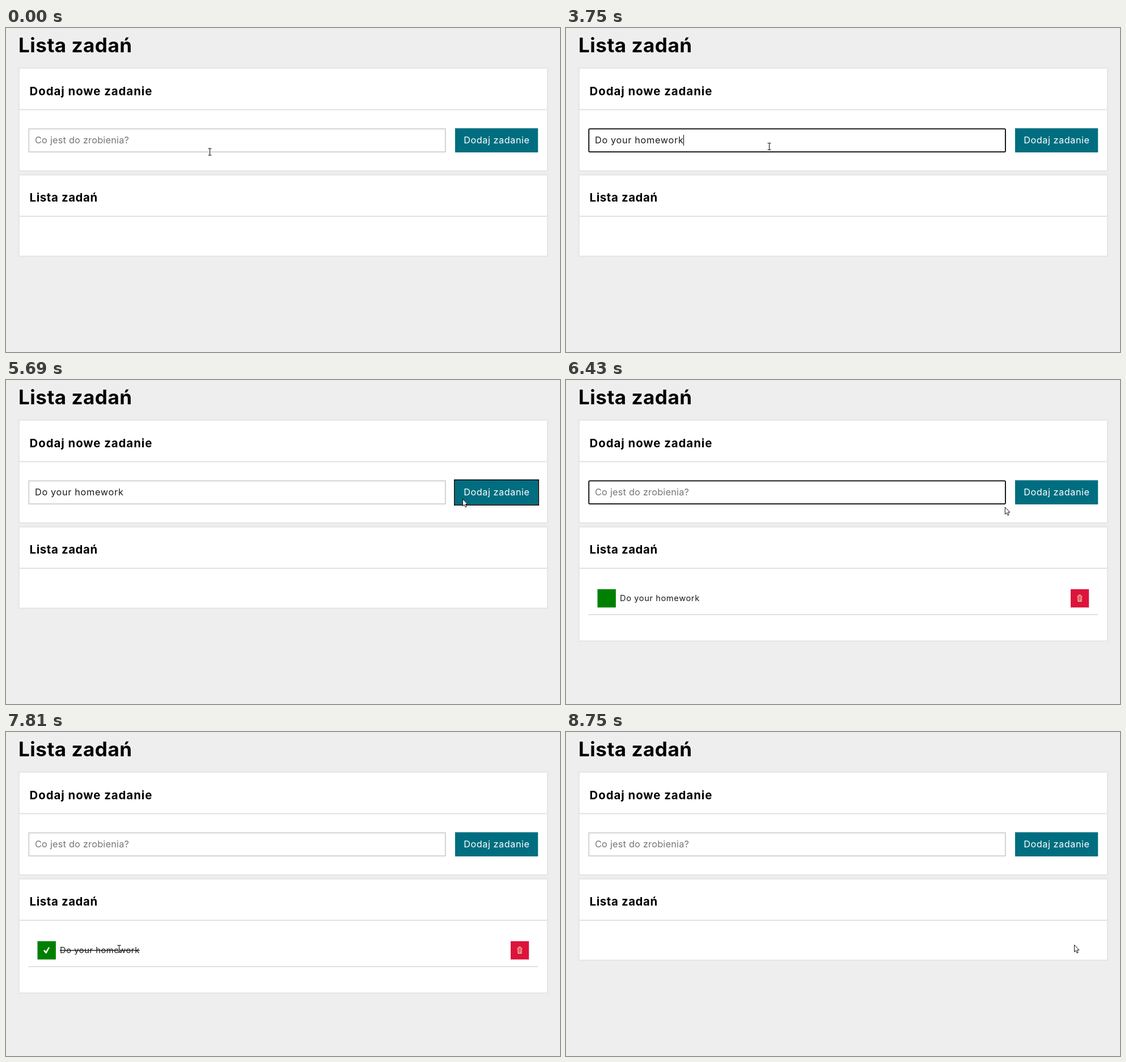
Recreate the animation shown at these times as an HTML page. Size 977 px wide and 573 px high, loop 9570 ms.

```html
<!DOCTYPE html>
<html lang="pl">
<head>
<meta charset="utf-8">
<title>Lista zadań</title>
<style>
  html, body { margin: 0; width: 100%; height: 100%; overflow: hidden; background: #eee; }
  svg { display: block; width: 977px; height: 573px; }
  text { font-family: Inter, "Open Sans", sans-serif; font-size: 16.3px; white-space: pre; }
  .h1 { font-size: 35px; font-weight: 700; letter-spacing: .5px; }
  .h2 { font-size: 20.4px; font-weight: 700; letter-spacing: .6px; }
  .h2.wide { letter-spacing: .94px; }
  .card { fill: #fff; stroke: #e7e7e7; stroke-width: 2.4; }
  .rule { stroke: #ddd; stroke-width: 1.7; }
  .field { fill: #fff; stroke: #ccc; stroke-width: 1.7; }
  .field.focus { stroke: #000; stroke-width: 1.8; }
  .hint { fill: #757575; letter-spacing: .22px; }
  .typed { fill: #1c1c1c; letter-spacing: .66px; }
  .label { fill: #fff; letter-spacing: .53px; }
  .task { fill: #1c1c1c; font-size: 14.7px; letter-spacing: .57px; }
  .task.done { text-decoration: line-through; }
  .ring { fill: none; stroke: #000; stroke-width: 1.7; }
</style>
</head>
<body>
<svg viewBox="0 0 977 573">
  <rect width="977" height="573" fill="#eee"/>
  <text class="h1" x="22" y="42.5">Lista zadań</text>

  <rect class="card" x="22.8" y="70.8" width="932.4" height="182"/>
  <text class="h2 wide" x="41.6" y="118.5">Dodaj nowe zadanie</text>
  <path class="rule" d="M24 144.3H954"/>
  <rect id="field" class="field" x="40.3" y="178.4" width="734.6" height="40.8"/>
  <text id="hint" class="hint" x="51" y="204">Co jest do zrobienia?</text>
  <text id="typed" class="typed" x="51" y="204"></text>
  <rect id="caret" y="189" width="1" height="19"/>
  <rect x="792" y="177.3" width="146.2" height="42.7" fill="#006e80"/>
  <rect id="addRing" class="ring" x="790.9" y="176.7" width="148.3" height="44.4"/>
  <text class="label" x="807.2" y="204">Dodaj zadanie</text>

  <rect id="list" class="card" x="22.8" y="259.6" width="932.4" height="144.2"/>
  <text class="h2" x="41.6" y="307">Lista zadań</text>
  <path class="rule" d="M24 332.8H954"/>

  <g id="item">
    <rect x="55.5" y="370" width="32.4" height="32.3" fill="#008000"/>
    <path id="tick" d="M66 386.6L68.2 385.2L70.2 388L75.2 380.3L77 381.2L71.4 391.4H69.6Z" fill="#fff"/>
    <text id="task" class="task" x="95" y="391">Do your homework</text>
    <rect x="890" y="370" width="32.2" height="32.3" fill="#dc143c"/>
    <g fill="none" stroke="#f3dfb4" stroke-width="1.1">
      <path d="M901.6 382.3H910.4M904 380.4H908M902.6 382.5L903.2 391.4H908.8L909.4 382.5"/>
      <path d="M904.8 383.5V390.5M907.2 383.5V390.5" stroke-width=".9"/>
    </g>
    <rect id="deleteRing" class="ring" x="889" y="369" width="34" height="34"/>
    <path class="rule" d="M39.5 414.8H938.3"/>
  </g>

  <path id="arrow" d="M.5 .5V13L3.2 10.4L5.2 15L7.2 14.1L5.3 9.6H9Z" fill="#fff" stroke="#111" stroke-width="1"/>
  <g id="beam" fill="none">
    <path d="M-3 -6H3M-3 6H3M0 -6V6" stroke="#fff" stroke-width="2.4"/>
    <path d="M-3 -6H-.8L0 -5.4L.8 -6H3M-3 6H-.8L0 5.4L.8 6H3M0 -5.5V5.5" stroke="#111" stroke-width="1.1"/>
  </g>
</svg>
<script>
const LOOP = 9570, BLINK = 530;
const FOCUS = 460, PRESS = 5620, ADDED = 5730, BLUR = 7200,
      DONE = 7260, PRESS_DELETE = 8640, DELETED = 8750;

// Typing comes in bursts of evenly spaced keys
const burst = (text, from, to) =>
  [...text].map((char, i) => ({ char, at: from + (to - from) * i / Math.max(1, text.length - 1) }));
const KEYS = [
  ...burst('D', 1320, 1320),
  ...burst('o you', 1650, 2050),
  ...burst('r home', 2280, 2950),
  ...burst('wo', 3180, 3350),
  ...burst('rk', 3680, 3750)
];

// Each move eases the pointer to a new spot; sag bends the path downwards
const HOME = { x: 359.5, y: 219 };
const MOVES = [
  { from: 230, to: 560, x: 358.5, y: 209.5, sag: 0, power: 2 },
  { from: 4640, to: 5490, x: 805, y: 210, sag: 18, power: 2 },
  { from: 6190, to: 7080, x: 80, y: 381, sag: 43, power: 4 },
  { from: 7150, to: 7340, x: 80, y: 387, sag: 0, power: 2 },
  { from: 7630, to: 8500, x: 896, y: 376, sag: -4, power: 1.4 }
];

const el = {};
document.querySelectorAll('[id]').forEach(e => el[e.id] = e);
const show = (e, on) => e.setAttribute('visibility', on ? 'inherit' : 'hidden');
const inside = (p, l, t, r, b) => p.x >= l && p.x <= r && p.y >= t && p.y <= b;
const ease = (k, power) =>
  k < .5 ? (2 * k) ** power / 2 : 1 - (2 - 2 * k) ** power / 2;

function pointer(t) {
  let p = HOME;
  for (const m of MOVES) {
    if (t < m.from) break;
    const k = ease(Math.min(1, (t - m.from) / (m.to - m.from)), m.power);
    p = {
      x: p.x + (m.x - p.x) * k,
      y: p.y + (m.y - p.y) * k + 4 * m.sag * k * (1 - k)
    };
  }
  return p;
}

function draw(t) {
  const keys = KEYS.filter(k => k.at <= t);
  const text = t < ADDED ? keys.map(k => k.char).join('') : '';
  const listed = t >= ADDED && t < DELETED;
  const done = listed && t >= DONE;
  const focused = (t >= FOCUS && t < PRESS) || (t >= ADDED && t < BLUR);

  if (el.typed.textContent !== text) el.typed.textContent = text;
  show(el.hint, !text);
  el.field.setAttribute('class', focused ? 'field focus' : 'field');
  el.field.setAttribute('rx', focused ? 1.5 : 0);

  const since = t >= ADDED ? ADDED : keys.length ? keys[keys.length - 1].at : FOCUS;
  show(el.caret, focused && (t - since) % (2 * BLINK) < BLINK);
  el.caret.setAttribute('x', text ? Math.round(50 + el.typed.getComputedTextLength()) : 51);

  show(el.addRing, t >= PRESS && t < ADDED);
  show(el.item, listed);
  show(el.tick, done);
  show(el.deleteRing, listed && t >= PRESS_DELETE);
  el.task.setAttribute('class', done ? 'task done' : 'task');
  el.list.setAttribute('height', listed ? 202.2 : 144.2);

  const p = pointer(t);
  const overText = inside(p, 40, 178, 775, 219.5) ||
    (listed && inside(p, 96, 376, 236, 395));
  for (const e of [el.arrow, el.beam]) e.setAttribute('transform', `translate(${p.x} ${p.y})`);
  show(el.beam, overText);
  show(el.arrow, !overText);
}

const start = performance.now();
function tick() {
  draw((performance.now() - start) % LOOP);
  requestAnimationFrame(tick);
}
tick();
</script>
</body>
</html>
```
